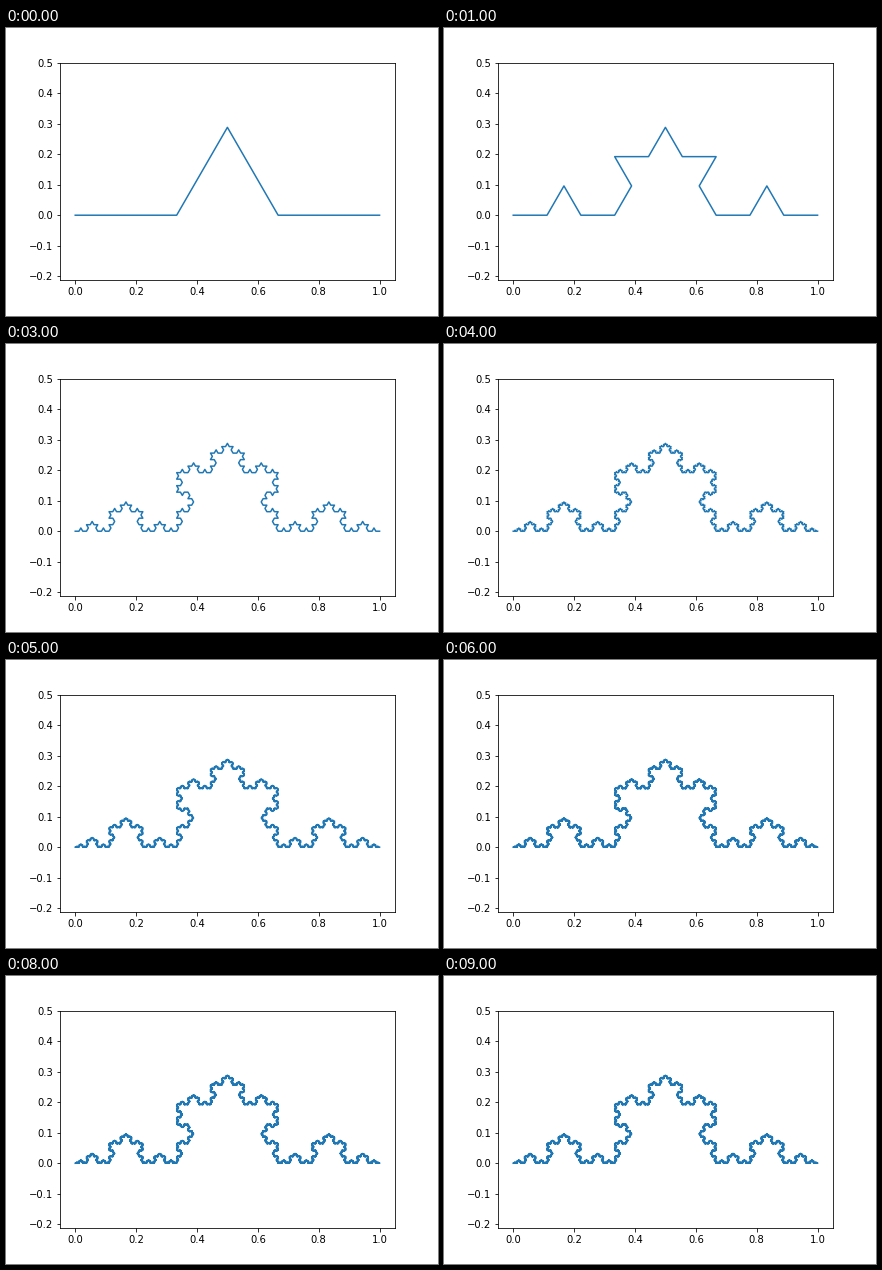
Recreate the animation shown at these times as a matplotlib script. Size 432 by 288 pixels, loop 10000 ms.

```python
import numpy as np
import matplotlib.pyplot as plt
from matplotlib.animation import FuncAnimation

LEVELS = 10
STEP_MS = 1000
TURN = np.exp(1j * np.pi / 3)


def refine(points):
    """Replace every segment with four, raising a triangular bump on its left."""
    start = points[:-1]
    third = np.diff(points) / 3
    parts = [start, start + third, start + third * (1 + TURN), start + 2 * third]
    return np.append(np.stack(parts, axis=1).ravel(), points[-1])


def koch_curves(levels):
    points = np.array([0, 1], dtype=complex)
    curves = []
    for _ in range(levels):
        points = refine(points)
        curves.append(points)
    return curves


curves = koch_curves(LEVELS)

plt.rcParams.update({"font.family": "DejaVu Sans", "font.size": 10})
fig, ax = plt.subplots(figsize=(6, 4), dpi=72)
fig.subplots_adjust(left=0.125, right=0.9, bottom=0.125, top=0.88)
line, = ax.plot(curves[0].real, curves[0].imag, color="#1f77b4", lw=1.5)
ax.axis("equal")


def update(i):
    line.set_data(curves[i].real, curves[i].imag)
    return line,


anim = FuncAnimation(fig, update, frames=LEVELS, interval=STEP_MS,
                     init_func=lambda: update(0), repeat=True, repeat_delay=0)
plt.show()
```
